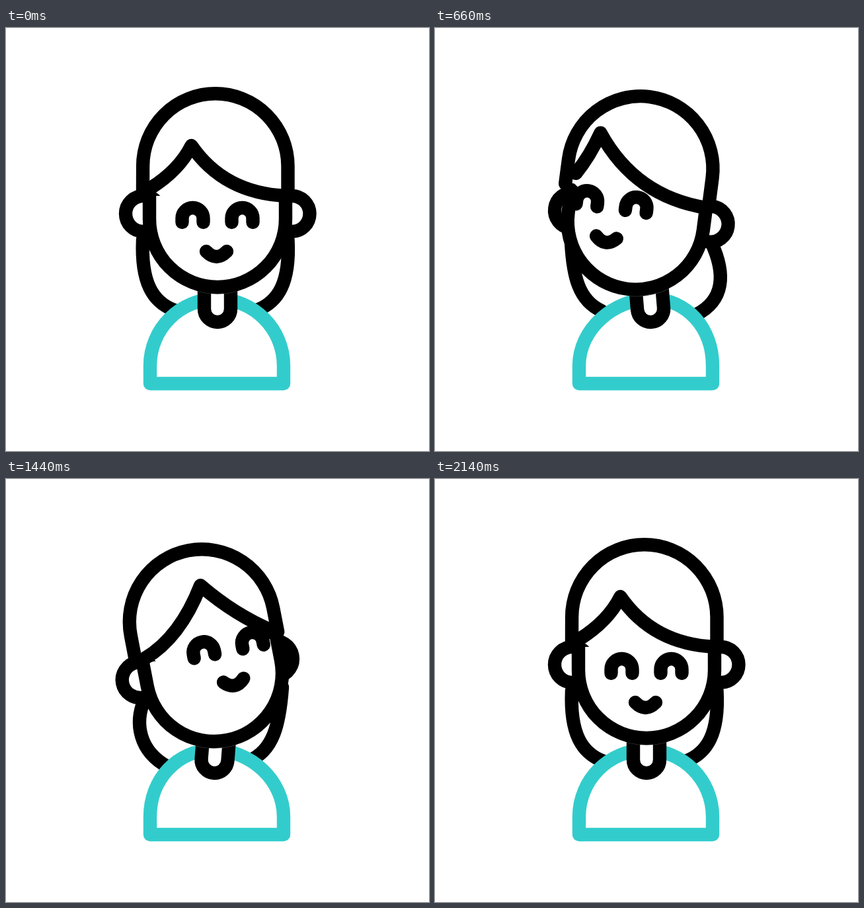
Recreate the animation shown at these times as an HTML page with a canvas. Size 640 by 640 pixels, loop 2400 ms.

```html
<!DOCTYPE html>
<html lang="en">
<head>
<meta charset="utf-8">
<style>
html, body { margin: 0; width: 100%; height: 100%; overflow: hidden; background: #fff; }
canvas { display: block; width: 640px; height: 640px; }
</style>
</head>
<body>
<canvas id="stage"></canvas>
<script>
const canvas = document.getElementById('stage');
const ctx = canvas.getContext('2d');
const dpr = window.devicePixelRatio || 1;
canvas.width = canvas.height = 640 * dpr;

const LOOP = 2400, TEAL = '#33cccc', INK = '#000';
const rad = deg => deg * Math.PI / 180;

// Each pose: head centre and tilt, face shift, fringe, ear shifts, back hair, neck, shoulder skew
const rest = {
  head: [317, 209, 0],
  face: [0, 0],
  fringe: [219, 242, 262, 215, 280.5, 178, 330, 250, 424, 254],
  ears: [0, 0, 0, 0],
  hairL: [207, 320, 204, 385, 222, 415, 255, 427],
  hairR: [426.5, 320, 430, 385, 412, 415, 379, 427],
  neck: [0, 0],
  skew: [0]
};
const left = {
  head: [310.8, 213, 7.6],
  face: [-40.6, -20.2],
  fringe: [221, 228, 238, 199, 249, 162.5, 314, 252, 424, 255],
  ears: [15.5, 4, 0, -2.5],
  hairL: [206, 325, 209, 375, 217, 412, 252, 428],
  hairR: [418, 325, 440.5, 372, 438.5, 412, 395.5, 434],
  neck: [6.3, -5],
  skew: [8]
};
const right = {
  head: [296.7, 216, -11],
  face: [28.2, -33],
  fringe: [221, 247, 280, 226, 325, 154.5, 368, 209, 421, 244],
  ears: [0, -3.6, -18, 4],
  hairL: [209, 335, 195, 368, 200, 412, 246, 436],
  hairR: [418, 315, 414, 370, 405, 412, 366, 427],
  neck: [-4.5, 4.5],
  skew: [-5]
};
const moves = [
  { from: rest, to: left, start: 0, end: 770, x1: .68 },
  { from: left, to: right, start: 770, end: 1440, x1: .68 },
  { from: right, to: rest, start: 1440, end: 2140, x1: .55 }
];

// Cubic-bezier easing (x1, 0, x2, 1)
function ease(x, x1, x2 = .48) {
  let lo = 0, hi = 1, u = .5;
  for (let i = 0; i < 24; i++) {
    u = (lo + hi) / 2;
    const v = 1 - u;
    if (3 * x1 * u * v * v + 3 * x2 * u * u * v + u * u * u < x) lo = u; else hi = u;
  }
  return u * u * (3 - 2 * u);
}

function poseAt(t) {
  const move = moves.find(m => t < m.end);
  if (!move) return rest;
  const p = ease((t - move.start) / (move.end - move.start), move.x1);
  const pose = {};
  for (const key in rest)
    pose[key] = move.from[key].map((a, i) => a + (move.to[key][i] - a) * p);
  return pose;
}

function shape(build, { fill, stroke = INK, width = 20.4 } = {}) {
  ctx.beginPath();
  build();
  if (fill) { ctx.fillStyle = fill; ctx.fill(); }
  if (stroke) { ctx.strokeStyle = stroke; ctx.lineWidth = width; ctx.stroke(); }
}

function within(transform, paint) {
  ctx.save();
  transform();
  paint();
  ctx.restore();
}

function strand([x, y, ...curve]) {
  shape(() => { ctx.moveTo(x, y); ctx.bezierCurveTo(...curve); });
}

function body(skew) {
  const top = 319 + skew;
  shape(() => {
    ctx.moveTo(218, 538);
    ctx.lineTo(218, 511);
    ctx.bezierCurveTo(218, 455.2, top - 55.8, 410, top, 410);
    ctx.bezierCurveTo(top + 55.8, 410, 420, 455.2, 420, 511);
    ctx.lineTo(420, 538);
    ctx.closePath();
  }, { fill: '#fff', stroke: TEAL });
}

function eye(x) {
  shape(() => {
    ctx.moveTo(x - 16, 294);
    ctx.arc(x, 288, 16, Math.PI, 0);
    ctx.lineTo(x + 16, 294);
  });
}

function draw(t) {
  const pose = poseAt(t);
  const [hx, hy, tilt] = pose.head;
  const toHead = () => {
    ctx.translate(hx, hy);
    ctx.rotate(rad(tilt));
    ctx.translate(-317, -209);
  };

  ctx.setTransform(dpr, 0, 0, dpr, 0, 0);
  ctx.fillStyle = '#fff';
  ctx.fillRect(0, 0, 640, 640);
  ctx.lineCap = ctx.lineJoin = 'round';

  strand(pose.hairL);
  strand(pose.hairR);
  body(pose.skew[0]);

  ctx.save();
  within(() => {
    ctx.translate(320 + pose.neck[0], 425);
    ctx.rotate(rad(pose.neck[1]));
  }, () => {
    shape(() => {
      ctx.moveTo(20, -38);
      ctx.arc(0, 0, 20, 0, Math.PI);
      ctx.lineTo(-20, -38);
    }, { fill: '#fff' });
    ctx.beginPath();
    ctx.rect(-30, -40, 60, 70);
    ctx.clip();
    // Hairline between chin and neck
    ctx.setTransform(dpr, 0, 0, dpr, 0, 0);
    toHead();
    shape(() => ctx.arc(320, 289, 113.4, rad(50), rad(130)), { stroke: '#555', width: .8 });
  });
  ctx.restore();

  within(toHead, () => {
    const [lx, ly, rx, ry] = pose.ears;
    shape(() => ctx.arc(208 + lx, 281 + ly, 27, 0, 7), { fill: '#fff' });
    shape(() => ctx.arc(432.5 + rx, 281 + ry, 27, 0, 7), { fill: '#fff' });

    shape(() => {
      ctx.moveTo(207, 246);
      ctx.arc(316.8, 209, 109.7, Math.PI, 0);
      ctx.lineTo(426.5, 246);
    }, { fill: '#fff' });
    shape(() => {
      ctx.moveTo(423, 254);
      ctx.arc(320, 289, 103, 0, Math.PI);
      ctx.lineTo(217, 254);
    }, { fill: '#fff' });

    const f = pose.fringe;
    shape(() => {
      ctx.moveTo(f[0], f[1]);
      ctx.quadraticCurveTo(...f.slice(2, 6));
      ctx.quadraticCurveTo(...f.slice(6));
    });

    ctx.translate(...pose.face);
    eye(282.5);
    eye(357.5);
    shape(() => {
      ctx.moveTo(303, 338);
      ctx.quadraticCurveTo(318.5, 354, 334, 338);
    });
  });
}

const begin = performance.now();
function tick() {
  draw((performance.now() - begin) % LOOP);
  requestAnimationFrame(tick);
}
tick();
</script>
</body>
</html>
```
